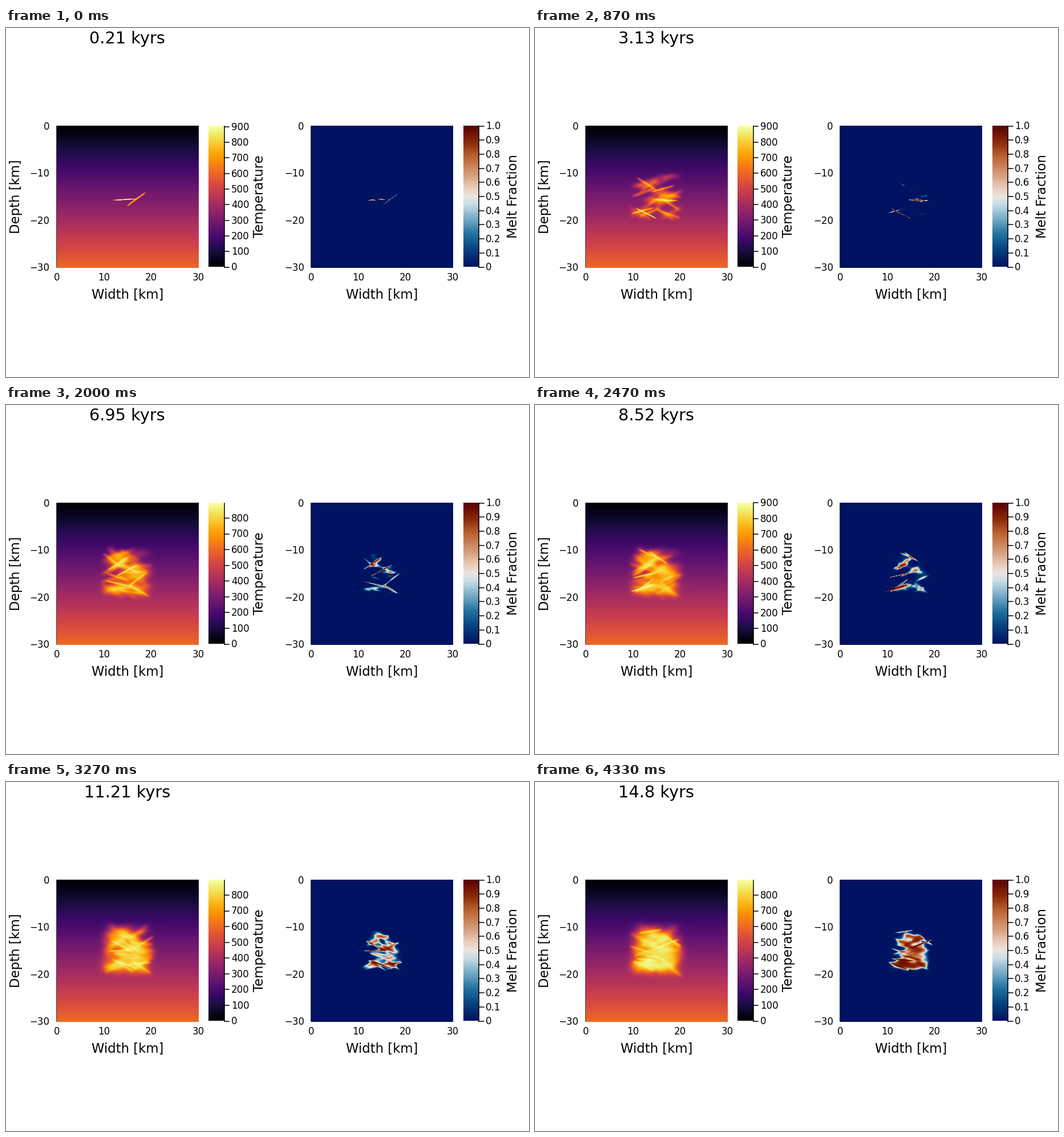
Animation of 917x611 px, one loop 4.39 s. Source, as a matplotlib script:

```python
import numpy as np
import matplotlib.pyplot as plt
from matplotlib.animation import FuncAnimation
from matplotlib.colors import LinearSegmentedColormap

WIDTH, HEIGHT, DPI = 917, 611, 100
FRAMES, LOOP_MS = 66, 4390

# Heat model, in km, kyr and degrees C
CELLS, SIZE = 500, 30.0
STEP, STEPS_PER_FRAME = 0.011223, 20
DIFFUSIVITY, LATENT = 0.0322, 80.0
MAGMA_T, GRADIENT = 900.0, 20.0
DIKE_EVERY = 8.92              # steps between two intrusions
HALF_LENGTH, HALF_THICKNESS = 2.46, 0.105

# Dikes are (centre x, centre depth, dip in degrees, positive rising right)
OPENING_DIKES = [(16.85, 15.5, 37), (14.45, 15.6, 3.5)]
DIKE_LOW, DIKE_HIGH = (11.4, 10.7, -38), (18.5, 19.0, 38)

VIK_COLORS = ["#001261", "#033E7D", "#1E6F9D", "#71A8C4", "#C9DDE7",
              "#EACEBD", "#D39774", "#BE6533", "#8B2706", "#590008"]
VIK = LinearSegmentedColormap.from_list("vik", sorted(
    [*zip(np.linspace(0, 1, 10), VIK_COLORS), (0.5, "#ECE5E0")]))

axis_km = np.linspace(0, SIZE, CELLS)
CORE = slice(125, 375)         # only this part of the section ever heats up
core_x, core_depth = np.meshgrid(axis_km[CORE], axis_km[CORE])
geotherm = np.repeat(GRADIENT * axis_km[:, None], CELLS, axis=1)


def melt_fraction(temp):
    return 1 / (1 + np.exp((800 - temp) / 23))


def dike_mask(x, depth, dip):
    c, s = np.cos(np.radians(dip)), np.sin(np.radians(dip))
    dx, up = core_x - x, depth - core_depth
    along, across = dx * c + up * s, up * c - dx * s
    return (along / HALF_LENGTH) ** 4 + (across / HALF_THICKNESS) ** 2 < 1


def simulate():
    rng = np.random.default_rng(12)
    steps = STEPS_PER_FRAME * FRAMES
    dikes = rng.uniform(DIKE_LOW, DIKE_HIGH, (int(steps / DIKE_EVERY) + 1, 3))
    dikes[:len(OPENING_DIKES)] = OPENING_DIKES
    spacing = axis_km[1] - axis_km[0]
    rate = DIFFUSIVITY * STEP / spacing ** 2
    temp = geotherm[CORE, CORE].copy()
    snapshots, done = [], 0
    for step in range(1, steps):
        if step >= (done + 1) * DIKE_EVERY:
            temp[dike_mask(*dikes[done])] = MAGMA_T
            done += 1
        inner = temp[1:-1, 1:-1]
        laplace = (temp[2:, 1:-1] + temp[:-2, 1:-1] + temp[1:-1, 2:]
                   + temp[1:-1, :-2] - 4 * inner)
        melt = melt_fraction(inner)
        capacity = 1 + LATENT / 23 * melt * (1 - melt)
        temp[1:-1, 1:-1] += rate * laplace / capacity
        if step % STEPS_PER_FRAME == STEPS_PER_FRAME - 1:
            snapshots.append(temp.astype(np.float32))
    return snapshots


snapshots = simulate()

plt.rcParams["font.family"] = "DejaVu Sans"
fig = plt.figure(figsize=(WIDTH / DPI, HEIGHT / DPI), dpi=DPI, facecolor="white")
ax = fig.add_axes([0, 0, 1, 1])
ax.axis("off")

TICK, LABEL, TITLE = 16.6, 22.7, 28.8
TOP, BOTTOM, PANEL = 171.5, 419.3, 247.8
BAR_BOTTOM = 418.5


def text(x, y, string, size, ha="center", rotation=0):
    return ax.text(x, y, string, fontsize=size * 72 / DPI, ha=ha, va="baseline",
                   rotation=rotation, rotation_mode="anchor", color="black")


def line(xs, ys, zorder=3):
    return ax.plot(xs, ys, color="black", lw=1.5 * 72 / DPI, zorder=zorder,
                   solid_capstyle="projecting")[0]


def picture(data, left, right, bottom, cmap, vmax):
    return ax.imshow(data, extent=(left, right, bottom, TOP), cmap=cmap, vmin=0,
                     vmax=vmax, interpolation="nearest", aspect="auto", zorder=2)


def panel(left, data, cmap, vmax):
    line([left, left, left + PANEL], [TOP, BOTTOM, BOTTOM], zorder=1)
    for km in (0, 10, 20, 30):
        offset = km / SIZE * PANEL
        text(left + offset, 442, str(km), TICK)
        text(left - 12.5, TOP + offset + 6, f"−{km}" if km else "0", TICK, "right")
    text(left + PANEL / 2, 474, "Width [km]", LABEL)
    return picture(data, left - 0.3, left + PANEL, BOTTOM + 0.3, cmap, vmax)


def color_bar(left, right, cmap, labels):
    picture(np.linspace(1, 0, 256)[:, None], left, right, BAR_BOTTOM, cmap, 1)
    line([right, right], [TOP, BAR_BOTTOM])
    return [(line([right, right + 8.5], [0, 0]),
             text(right + 12.3, 0, label, TICK, "left")) for label in labels]


def place_ticks(ticks, step, vmax):
    for i, (mark, label) in enumerate(ticks):
        y = BAR_BOTTOM - (BAR_BOTTOM - TOP) * i * step / vmax
        mark.set_ydata([y, y])
        label.set_y(y + 5.9)
        for artist in (mark, label):
            artist.set_visible(y > TOP - 0.3)


temp_field = geotherm.copy()
melt_field = melt_fraction(geotherm)
temp_image = panel(89, temp_field, "inferno", MAGMA_T)
melt_image = panel(535.3, melt_field, VIK, 1)
temp_ticks = color_bar(355, 382.5, "inferno", [str(t) for t in range(0, 901, 100)])
melt_ticks = color_bar(801.5, 829, VIK,
                       ["0"] + [f"{i / 10:.1f}" for i in range(1, 11)])
place_ticks(melt_ticks, 0.1, 1)

text(24, 295.3, "Depth [km]", LABEL, rotation=90)
text(450.5, 294.3, "Temperature", LABEL, rotation=90)
text(896.5, 295, "Melt Fraction", LABEL, rotation=90)
title = text(212.5, 26.7, "", TITLE)

ax.set_xlim(0, WIDTH)
ax.set_ylim(HEIGHT, 0)


def update(k):
    steps = STEPS_PER_FRAME * (k + 1) - 1
    time = steps * STEP
    title.set_text(f"{round(time, 2)} kyrs")

    # A fresh intrusion lifts the top of the scale, less so as the rock warms
    fresh = (steps / DIKE_EVERY) % 1 < 0.3
    vmax = 896 + 9 * fresh * (1 - time / 14.8)
    temp_field[CORE, CORE] = snapshots[k]
    melt_field[CORE, CORE] = melt_fraction(snapshots[k])
    temp_image.set_data(temp_field)
    temp_image.set_clim(0, vmax)
    melt_image.set_data(melt_field)
    place_ticks(temp_ticks, 100, vmax)
    return []


anim = FuncAnimation(fig, update, frames=FRAMES, interval=LOOP_MS / FRAMES,
                     repeat=True, repeat_delay=0, blit=False)
plt.show()
```
